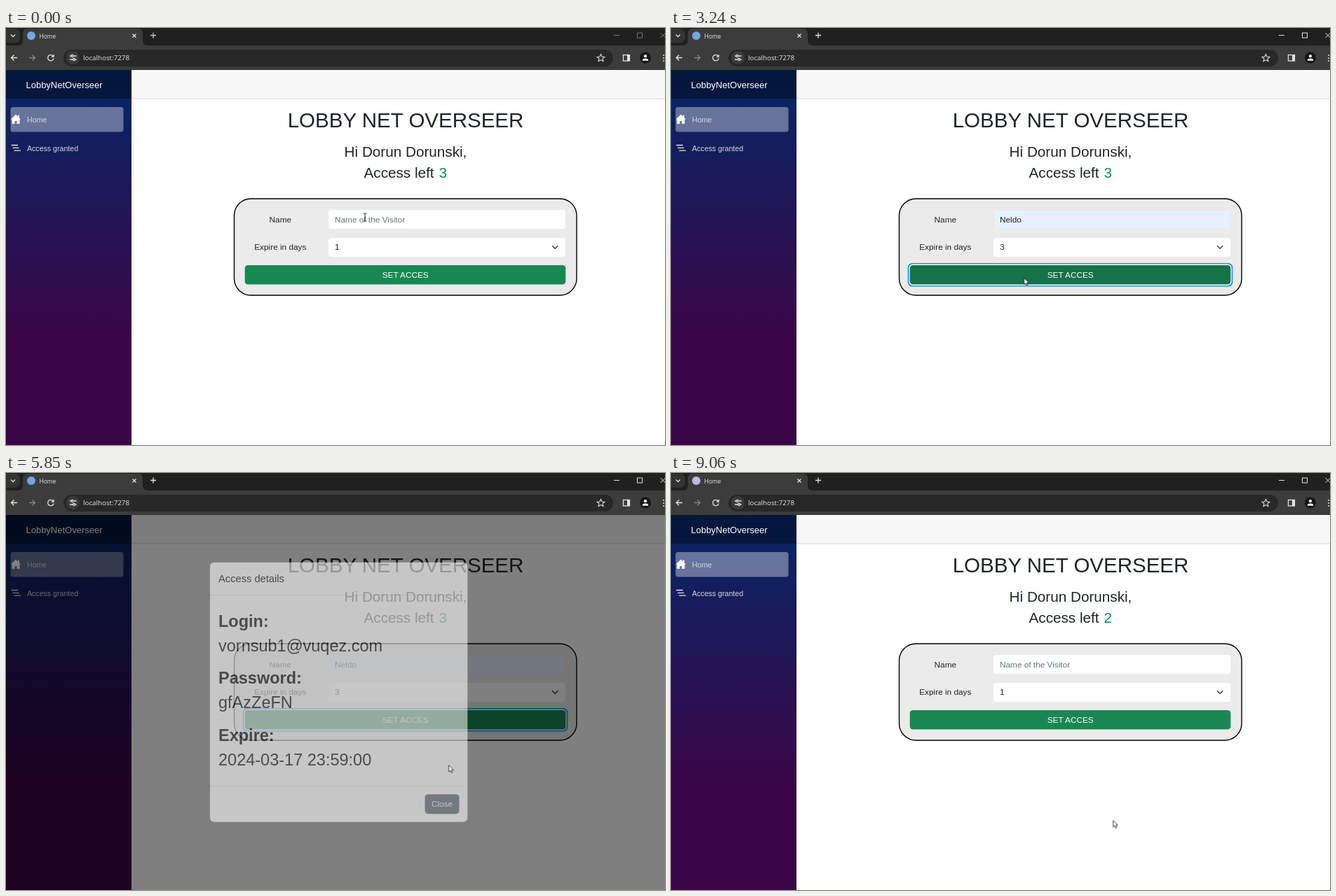
These frames come from a looping animation (940x596 px, 9.93 s). An HTML page:

```html
<!DOCTYPE html>
<html lang="en">
<head>
<meta charset="utf-8">
<title>Guest access</title>
<style>
html, body { margin: 0; width: 100%; height: 100%; overflow: hidden; background: #fff; }
svg { display: block; width: 940px; height: 596px; }
text { font: 11.8px "Liberation Sans", Arial, sans-serif; fill: #212529; white-space: pre; }
.ui { font-family: "Open Sans", "Noto Sans", sans-serif; fill: #e8e8e8; }
.mid { text-anchor: middle; }
.white { fill: #fff; }
.h1 { font-size: 29.5px; }
.h2 { font-size: 20.7px; }
.big { font-size: 23.5px; }
.bold { font-weight: bold; }
.nav { font-size: 10.6px; fill: #d7d7d7; }
.green { fill: #198754; }
.line { fill: none; stroke: #e3e3e3; stroke-width: 1.3; }
.ring { fill: #c2dbfe; }

/* One 9.93 s loop drives everything; .cut switches, .run moves. */
.cut { animation: 9.93s step-end infinite; }
.run { animation: 9.93s linear infinite; }

@keyframes wake { 0% { opacity: .45 } .302%, 100% { opacity: 1 } }
@keyframes wakePlus { 0% { opacity: .85 } .302%, 100% { opacity: 1 } }
@keyframes tabIcon { 0% { fill: #72a7e2 } 70.091%, 100% { fill: #bcb8e2 } }
@keyframes content { 0% { opacity: 1 } 70.091% { opacity: 0 } 83.686%, 100% { opacity: 1 } }
@keyframes before { 0% { opacity: 1 } 70.091%, 100% { opacity: 0 } }
@keyframes after { 0% { opacity: 0 } 70.091%, 100% { opacity: 1 } }
@keyframes empty { 0% { opacity: 1 } 6.042% { opacity: 0 } 70.091%, 100% { opacity: 1 } }
@keyframes filled { 0% { opacity: 0 } 6.042% { opacity: 1 } 70.091%, 100% { opacity: 0 } }
@keyframes nameFocus { 0% { opacity: 0 } .806% { opacity: 1 } 16.516%, 100% { opacity: 0 } }
@keyframes suggest { 0% { opacity: 0 } 1.309% { opacity: 1 } 10.876%, 100% { opacity: 0 } }
@keyframes suggestHover { 0% { opacity: 0 } 6.042%, 100% { opacity: 1 } }
@keyframes daysFocus { 0% { opacity: 0 } 16.516% { opacity: 1 } 32.628%, 100% { opacity: 0 } }
@keyframes one { 0% { opacity: 1 } 26.385% { opacity: 0 } 70.091%, 100% { opacity: 1 } }
@keyframes three { 0% { opacity: 0 } 26.385% { opacity: 1 } 70.091%, 100% { opacity: 0 } }
@keyframes list { 0% { opacity: 0 } 17.12% { opacity: 1 } 26.385%, 100% { opacity: 0 } }
@keyframes row1 { 0% { opacity: 1 } 21.652%, 100% { opacity: 0 } }
@keyframes row2 { 0% { opacity: 0 } 21.652% { opacity: 1 } 22.759%, 100% { opacity: 0 } }
@keyframes row3 { 0% { opacity: 0 } 22.759%, 100% { opacity: 1 } }
@keyframes hover { 0%, 28.802% { fill: #198754 } 30.413%, 33.031% { fill: #157347 } 34.542%, 100% { fill: #198754 } }
@keyframes buttonFocus { 0% { opacity: 0 } 32.628% { opacity: 1 } 70.091%, 100% { opacity: 0 } }
@keyframes dim {
  0%, 33.031% { opacity: 0 } 34.542%, 52.971% { opacity: .5 }
  55.388%, 56.445% { opacity: 0 } 57.956%, 68.479% { opacity: .5 }
  69.99%, 70.493% { opacity: 0 } 72.004%, 83.686% { opacity: .5 }
  86.203%, 100% { opacity: 0 }
}
@keyframes authorise { 0%, 33.031% { opacity: 0 } 34.542%, 52.971% { opacity: 1 } 55.388%, 100% { opacity: 0 } }
@keyframes loading { 0%, 70.493% { opacity: 0 } 72.004%, 83.686% { opacity: 1 } 86.203%, 100% { opacity: 0 } }
@keyframes spin { from { transform: rotate(226.8deg) } to { transform: rotate(4993.2deg) } }
@keyframes modalFade { 0%, 58.077% { opacity: 0 } 59.587%, 65.458% { opacity: 1 } 66.969%, 100% { opacity: 0 } }
@keyframes modalSlide {
  0% { transform: translateY(-17px) }
  58.077% { transform: translateY(-17px); animation-timing-function: ease-out }
  61.098% { transform: translateY(24px) }
  65.458% { transform: translateY(24px); animation-timing-function: ease-out }
  68.479%, 100% { transform: translateY(-17px) }
}
@keyframes beam { 0% { opacity: 1 } 5.639%, 100% { opacity: 0 } }
@keyframes arrow { 0% { opacity: 0 } 5.639%, 100% { opacity: 1 } }
@keyframes pointer {
  0%, 5.639% { transform: translate(512px, 272px) }
  7.049%, 11.279% { transform: translate(512px, 302px) }
  15.106%, 19.235% { transform: translate(535px, 310.5px) }
  23.464%, 28.802% { transform: translate(533px, 366px) }
  30.413%, 46.324% { transform: translate(503.3px, 357px) }
  50.352%, 52.971% { transform: translate(629px, 404px) }
  54.381%, 60.423% { transform: translate(631.3px, 417.3px) }
  63.948%, 89.93% { transform: translate(634.3px, 493.7px) }
  91.239%, 100% { transform: translate(630.4px, 496.3px) }
}
</style>
</head>
<body>
<svg viewBox="0 0 940 596">
  <defs>
    <linearGradient id="side" gradientUnits="userSpaceOnUse" x1="0" y1="60" x2="0" y2="606">
      <stop offset="0" stop-color="#052767"/>
      <stop offset=".7" stop-color="#3a0647"/>
    </linearGradient>
    <filter id="shadow" x="-10%" y="-20%" width="120%" height="150%">
      <feDropShadow dx="0" dy="2" stdDeviation="2" flood-opacity=".3"/>
    </filter>
    <path id="spinner" d="M7.64 7.64A10.8 10.8 0 1 1 7.64 -7.64" fill="none" stroke="#fff" stroke-width="3"/>
  </defs>

  <!-- browser frame -->
  <rect width="940" height="60" fill="#202020"/>
  <rect x="-8" y="1" width="28" height="20" rx="7" fill="#333"/>
  <path d="M7 9.5l3 3 3-3" class="line"/>
  <path d="M17 25q7 0 7-7V8q0-7 7-7H188q7 0 7 7V18q0 7 7 7H940V60H0V25z" fill="#3c3c3c"/>
  <circle class="cut" cx="36" cy="11" r="6" style="animation-name:tabIcon"/>
  <text class="ui" x="47.500" y="14.700" style="font-size:8.400px">Home</text>
  <path d="M180.500 8.500l5 5m0-5l-5 5" class="line"/>
  <path class="line cut" d="M206 10.500h8m-4-4v8" style="animation-name:wakePlus"/>
  <g class="line cut" style="animation-name:wake">
    <path d="M867 10.500h8M933.500 7l7 7m0-7l-7 7" stroke-width="1"/>
    <rect x="900.500" y="7" width="7" height="7" stroke-width="1"/>
  </g>
  <path d="M16 42.500H7.500m4-4l-4 4 4 4" class="line"/>
  <path d="M33 42.500h8.500m-4-4l4 4-4 4" class="line" style="stroke:#858585"/>
  <path d="M67 39.800a4.200 4.200 0 1 0 1 3.500M68 38v3h-3" class="line"/>
  <rect x="82" y="31" width="784" height="24" rx="12" fill="#282828"/>
  <circle cx="95.500" cy="42.500" r="9.500" fill="#3c3c3c"/>
  <path d="M91 40h2m3.500 0h4M91 45h4m3.500 0h2" class="line"/>
  <circle cx="94.500" cy="40" r="1.500" class="line"/>
  <circle cx="97" cy="45" r="1.500" class="line"/>
  <text class="ui" x="110" y="46.300" style="font-size:9.800px">localhost:7278</text>
  <path d="M848.500 37.500l1.600 3.500 3.800.4-2.900 2.500.9 3.700-3.400-2-3.400 2 .9-3.700-2.900-2.500 3.800-.4z" class="line" style="stroke-width:1.100"/>
  <rect x="880.500" y="38.500" width="9" height="8.500" class="line"/>
  <path d="M886 38.500h3.500V47H886z" fill="#e3e3e3"/>
  <circle cx="912" cy="42.500" r="8" fill="#161616"/>
  <circle cx="912" cy="40.200" r="2.100" fill="#fff"/>
  <path d="M907.700 46.800q0-3.300 4.300-3.300t4.300 3.300z" fill="#fff"/>
  <g fill="#e3e3e3">
    <circle cx="938" cy="39" r="1"/><circle cx="938" cy="43" r="1"/><circle cx="938" cy="47" r="1"/>
  </g>

  <!-- page shell -->
  <rect y="60" width="940" height="536" fill="#fff"/>
  <rect x="179" y="60" width="761" height="41" fill="#f7f7f7"/>
  <rect x="179" y="100.500" width="761" height="1" fill="#d6d5d5"/>
  <rect y="60" width="179" height="536" fill="url(#side)"/>
  <rect y="60" width="179" height="41" fill="#000" opacity=".4"/>
  <text class="mid white" x="83" y="85.500" style="font-size:13px">LobbyNetOverseer</text>
  <rect x="6.500" y="113" width="161" height="35.500" rx="3.500" fill="#fff" opacity=".37"/>
  <path d="M7 130.500l7-7 3 3v-2h2v4l2 2h-1.500v6.500h-4v-4h-3v4h-4v-6.500z" fill="#fff"/>
  <text class="nav white" x="30" y="134.500">Home</text>
  <path d="M7.500 167.500h9.500M9.500 171.300h9M11.500 175.200h9.500" class="line"/>
  <text class="nav" x="30" y="175.800">Access granted</text>

  <!-- main content -->
  <g class="cut" style="animation-name:content">
    <text class="h1 mid" x="570" y="142">LOBBY NET OVERSEER</text>
    <text class="h2 mid" x="570" y="184">Hi Dorun Dorunski,</text>
    <text class="h2" x="510.500" y="214">Access left</text>
    <text class="h2 green cut" x="617.500" y="214" style="animation-name:before">3</text>
    <text class="h2 green cut" x="617.500" y="214" style="animation-name:after">2</text>

    <rect x="325.500" y="244" width="488.500" height="138" rx="24" fill="#ebebeb" stroke="#000" stroke-width="1.400"/>
    <text class="mid" x="391.300" y="277.500">Name</text>
    <text class="mid" x="391.300" y="317.300">Expire in days</text>

    <rect class="ring cut" x="457" y="257" width="344" height="33" rx="6" style="animation-name:nameFocus"/>
    <rect x="460" y="260" width="338" height="27" rx="4" fill="#fff"/>
    <text class="cut" x="469" y="277.500" style="animation-name:empty;fill:#6c757d">Name of the Visitor</text>
    <g class="cut" style="animation-name:filled">
      <rect x="460.500" y="260.500" width="337" height="26" rx="4" fill="#e8f0fe" stroke="#dbe5f3" stroke-width=".8"/>
      <text x="469" y="277.500">Neldo</text>
    </g>

    <rect class="ring cut" x="457" y="297" width="344" height="33" rx="6" style="animation-name:daysFocus"/>
    <rect class="cut" x="459.500" y="299.500" width="339" height="28" rx="4.500" fill="#86b7fe" style="animation-name:daysFocus"/>
    <rect x="460" y="300" width="338" height="27" rx="4" fill="#fff"/>
    <text class="cut" x="469" y="317.300" style="animation-name:one">1</text>
    <text class="cut" x="469" y="317.300" style="animation-name:three">3</text>
    <path d="M779.500 311.500l3.700 3.700 3.700-3.700" fill="none" stroke="#343a40" stroke-width="1.400" stroke-linecap="round"/>

    <g class="cut" style="animation-name:buttonFocus">
      <rect x="337.700" y="335.900" width="463.600" height="33.700" rx="6.500" fill="#258cfb"/>
      <rect x="339.400" y="337.600" width="460.200" height="30.300" rx="5.500" fill="#fff"/>
    </g>
    <rect class="run" x="340.700" y="339" width="457.600" height="27.500" rx="4.500" style="animation-name:hover"/>
    <text class="mid white" x="569.700" y="357">SET ACCES</text>

    <!-- name suggestion -->
    <g class="cut" style="animation-name:suggest">
      <rect x="460" y="290" width="170" height="34" rx="4" fill="#fff" filter="url(#shadow)"/>
      <rect class="cut" x="460" y="296" width="170" height="22" fill="#e8e8e9" style="animation-name:suggestHover"/>
      <text x="469" y="311">Neldo</text>
    </g>

    <!-- days list -->
    <g class="cut" style="animation-name:list">
      <rect x="460.500" y="326.500" width="338" height="75" fill="#fff" stroke="#767676" filter="url(#shadow)"/>
      <text x="469.500" y="338">1</text>
      <text x="469.500" y="352.700">2</text>
      <text x="469.500" y="367.400">3</text>
      <text x="469.500" y="382.100">4</text>
      <text x="469.500" y="396.800">5</text>
      <g class="cut" style="animation-name:row1">
        <rect x="461" y="327" width="337" height="15" fill="#1967d2"/>
        <text class="white" x="469.500" y="338">1</text>
      </g>
      <g class="cut" style="animation-name:row2">
        <rect x="461" y="341.700" width="337" height="15" fill="#1967d2"/>
        <text class="white" x="469.500" y="352.700">2</text>
      </g>
      <g class="cut" style="animation-name:row3">
        <rect x="461" y="356.400" width="337" height="15" fill="#1967d2"/>
        <text class="white" x="469.500" y="367.400">3</text>
      </g>
    </g>
  </g>

  <!-- overlays -->
  <rect class="run" y="60" width="940" height="536" style="animation-name:dim"/>
  <g class="run" style="animation-name:authorise">
    <g transform="translate(475 323.500)"><use href="#spinner" class="run" style="animation-name:spin"/></g>
    <text class="mid white" x="474.500" y="352">Authorising access, please wait...</text>
  </g>
  <g class="run" style="animation-name:loading">
    <g transform="translate(475 323.500)"><use href="#spinner" class="run" style="animation-name:spin"/></g>
    <text class="mid white" x="474.500" y="352">Loading data, please wait ...</text>
  </g>

  <g class="run" style="animation-name:modalFade">
    <g class="run" style="animation-name:modalSlide">
      <rect x="291" y="127.500" width="367.300" height="371" rx="6" fill="#fff"/>
      <path d="M291 174.500h367.300M291 447.500h367.300" stroke="#dee2e6" stroke-width=".8"/>
      <text x="303" y="155.800" style="font-size:14.700px">Access details</text>
      <text class="big bold" x="303" y="219.500">Login:</text>
      <text class="big" x="303" y="254.800">vornsub1@vuqez.com</text>
      <text class="big bold" x="303" y="301">Password:</text>
      <text class="big" x="303" y="336.300">gfAzZeFN</text>
      <text class="big bold" x="303" y="382.500">Expire:</text>
      <text class="big" x="303" y="417.800">2024-03-17 23:59:00</text>
      <rect x="597.500" y="459" width="49" height="28" rx="4.500" fill="#6c757d"/>
      <text class="mid white" x="622" y="477.200">Close</text>
    </g>
  </g>

  <!-- mouse pointer -->
  <path class="cut" d="M509.700 265h1.600l.7.700.7-.7h1.600M512 265.700v9.600M509.700 276h1.600l.7-.7.7.7h1.600" fill="none" stroke="#222" style="animation-name:beam"/>
  <g class="cut" style="animation-name:arrow">
    <path class="run" d="M.3.300V9.700L2.500 7.700 4 11.200 5.600 10.500 4.100 7.100H7z" fill="#fff" stroke="#111" stroke-width=".8" style="animation-name:pointer"/>
  </g>
</svg>
</body>
</html>
```
